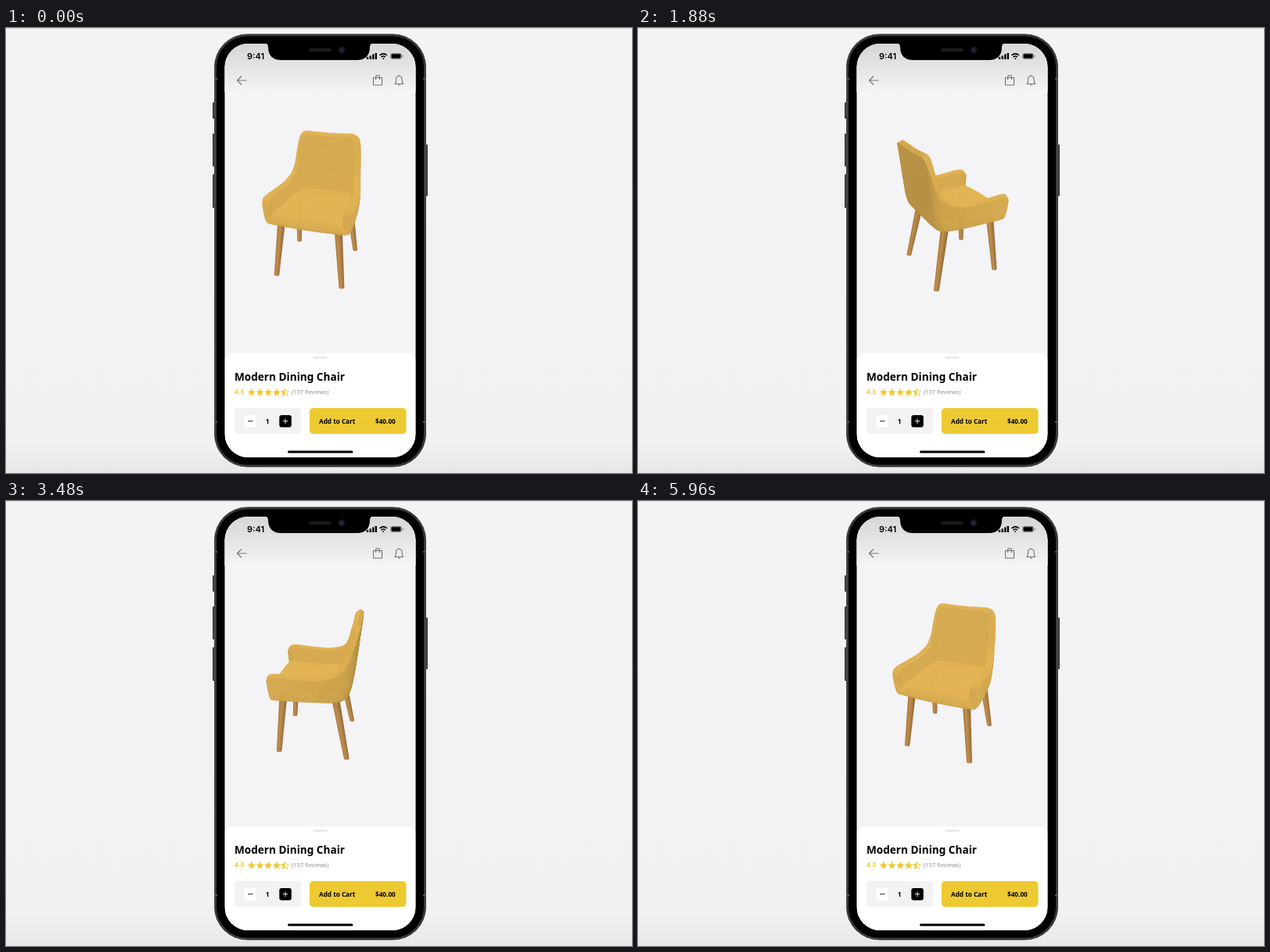
An HTML page with a canvas for the animation above (6 s loop, 800x569 px).

```html
<!DOCTYPE html>
<html lang="en">
<head>
<meta charset="utf-8">
<title>Modern Dining Chair</title>
<style>
  html, body { margin: 0; width: 100%; height: 100%; overflow: hidden; background: #f2f1f2; }
  svg, canvas { position: absolute; left: 0; top: 0; width: 800px; height: 569px; }
  text { font-family: "Noto Sans", sans-serif; }
</style>
</head>
<body>
<svg viewBox="0 0 800 569">
  <defs>
    <linearGradient id="room" x2="0" y2="1">
      <stop offset="0" stop-color="#f4f3f4"/>
      <stop offset=".93" stop-color="#f2f1f2"/>
      <stop offset="1" stop-color="#e7e7e7"/>
    </linearGradient>
    <linearGradient id="fade" x2="0" y2="1">
      <stop offset="0" stop-color="#d6d6d7"/>
      <stop offset="1" stop-color="#f4f3f5"/>
    </linearGradient>
    <clipPath id="screen"><rect x="279.500" y="20" width="244" height="529" rx="30"/></clipPath>
    <path id="star" d="M0-5.200 1.500-1.700 5-1.500 2.300.9 3.200 4.500 0 2.500-3.200 4.500-2.300.9-5-1.500-1.500-1.700z"/>
  </defs>
  <rect width="800" height="569" fill="url(#room)"/>
  <rect width="800" height="1" fill="#d9d9d9"/>

  <g fill="#3c3f3d">
    <rect x="264" y="95" width="4" height="21" rx="1"/>
    <rect x="264" y="135" width="4" height="42" rx="1"/>
    <rect x="264" y="187" width="4" height="43" rx="1"/>
    <rect x="535" y="149" width="4" height="66" rx="1"/>
  </g>
  <rect x="266.500" y="8" width="270" height="553" rx="42" fill="#000" stroke="#4d504e"/>
  <rect x="268" y="9.500" width="267" height="550" rx="40.500" fill="#000" stroke="#3a3d3b" stroke-width="2"/>
  <path d="M266 65h4M533 65h4M266 504h4M533 504h4" stroke="#5b5e5c" stroke-width="2"/>
  <g clip-path="url(#screen)">
    <rect x="279" y="20" width="246" height="530" fill="#f4f3f5"/>
    <rect x="279" y="20" width="246" height="62" fill="url(#fade)"/>
    <rect x="280" y="416" width="243.500" height="150" rx="9" fill="#fff"/>
  </g>

  <text x="308" y="40" font-size="11" font-weight="600" style="font-family:Inter,sans-serif">9:41</text>
  <path d="M462 40v-3M465.700 40v-4.500M469.300 40v-6.500M472.800 40v-8" stroke="#000" stroke-width="2.300"/>
  <g fill="none" stroke="#000" stroke-width="1.500">
    <path d="M477.500 35q4.700-4.300 9.400 0M479.500 37.300q2.700-2.500 5.400 0"/>
    <path d="M481.300 39.200h1.800"/>
  </g>
  <rect x="491.500" y="32.500" width="14" height="7" rx="2" fill="none" stroke="#888"/>
  <rect x="492.500" y="33.300" width="12" height="5.400" rx="1" fill="#000"/>
  <path d="M507.200 34.500v3" stroke="#888"/>
  <path d="M328 19q7 0 7 5 0 17 17 17h96q17 0 17-17 0-5 7-5z"/>
  <rect x="387" y="26" width="29" height="4" rx="2" fill="#1d1d1e"/>
  <circle cx="429" cy="28" r="4.500" fill="#16181f"/>
  <circle cx="429" cy="28" r="2" fill="#252b3d"/>

  <g fill="none" stroke="#757576" stroke-width="1.100" stroke-linejoin="round">
    <path d="M307.500 67H296M301 61.500 295.500 67l5.500 5.500"/>
    <path d="M469.500 63.500h11v9.500h-11zM472.500 66v-3q0-2.500 2.500-2.500t2.500 2.500v3"/>
    <path d="M497 71.500h10.600q-1.500-1.400-1.500-5.200 0-5-3.800-5t-3.800 5q0 3.800-1.500 5.200zM501 72.500q1.300 1.400 2.600 0M502.300 60v1.200"/>
  </g>

  <rect x="393" y="421" width="17.500" height="1.500" rx=".7" fill="#d9d9da"/>
  <text x="292" y="451" font-size="13.600" font-weight="600">Modern Dining Chair</text>
  <g fill="#efc833">
    <text x="292" y="468" font-size="8.400" font-weight="600">4.3</text>
    <use href="#star" x="313.800" y="466"/>
    <use href="#star" x="324.500" y="466"/>
    <use href="#star" x="335.200" y="466"/>
    <use href="#star" x="345.900" y="466"/>
    <use href="#star" x="356.600" y="466" fill="none" stroke="#efc833" stroke-width=".8"/>
    <path d="M356.600 460.800v7.700l-3.200 2 .9-3.600-2.700-2.400 3.500-.2z"/>
  </g>
  <text x="365" y="468" font-size="7.500" fill="#929293">(137 Reviews)</text>

  <rect x="292" y="486" width="85" height="33" rx="4" fill="#f3f2f3"/>
  <rect x="304.500" y="495" width="15.500" height="15.500" rx="3" fill="#fff"/>
  <rect x="349.300" y="495" width="15.500" height="15.500" rx="3"/>
  <path d="M309 502.700h6.500" stroke="#222"/>
  <path d="M353.800 502.700h6.500M357 499.500v6.500" stroke="#fff" stroke-width=".9"/>
  <text x="334.300" y="506" font-size="8.500" font-weight="600" text-anchor="middle">1</text>
  <rect x="388" y="486" width="123.500" height="33" rx="4.500" fill="#edca32"/>
  <g font-size="8.200" font-weight="600">
    <text x="400" y="506">Add to Cart</text>
    <text x="472" y="506">$40.00</text>
  </g>
  <circle cx="459.700" cy="503" r=".7" fill="#b59a25"/>
  <rect x="360" y="540.500" width="83.500" height="3" rx="1.500"/>
</svg>
<canvas id="stage" width="800" height="569"></canvas>
<script>
const ctx = document.getElementById('stage').getContext('2d');
const PITCH = 27 * Math.PI / 180, SP = Math.sin(PITCH), CP = Math.cos(PITCH);
const DIST = 405, CX = 399, CY = 235.5, DROP = 64, BASE = 73;

// Turntable: seconds, degrees, degrees per second
const TURN = [[0, -17, 58], [.88, 38, 70], [1.88, 119, 90], [2.48, 175, 93],
              [3.48, 260, 72], [4.08, 293, 45], [6, 339, 40]];

// Half of the shell from the middle of the back to the arm tip:
// top x, top z, top height, bottom x, bottom z
const HALF = [
  [0, -47, 154.5, 0, -34], [20, -47, 155, 16, -34], [32, -46.5, 155, 27, -33.5],
  [37, -45, 149, 33, -32.5], [39.5, -41, 133, 37, -29], [41, -36, 118, 39, -25],
  [43, -27, 108, 41, -18], [46.5, -9, 102.5, 42.5, -6], [48.5, 12, 102, 44, 12],
  [49, 35, 103.5, 45, 31], [48.5, 43, 102, 45, 40], [47.5, 46, 98, 44.5, 43]];

const lerp = (a, b, t) => a + (b - a) * t;
const sub = (a, b) => a.map((v, i) => v - b[i]);
const cross = (a, b) => [a[1] * b[2] - a[2] * b[1], a[2] * b[0] - a[0] * b[2], a[0] * b[1] - a[1] * b[0]];

function hermite(a, b, ma, mb, t) {
  const t2 = t * t, t3 = t2 * t;
  return a * (2 * t3 - 3 * t2 + 1) + ma * (t3 - 2 * t2 + t) + b * (3 * t2 - 2 * t3) + mb * (t3 - t2);
}

function yawAt(s) {
  let i = 0;
  while (i < TURN.length - 2 && s > TURN[i + 1][0]) i++;
  const [t0, a, ma] = TURN[i], [t1, b, mb] = TURN[i + 1], d = t1 - t0;
  return hermite(a, b, ma * d, mb * d, (s - t0) / d) * Math.PI / 180;
}

const profile = [...HALF.slice(1).reverse().map(([x, z, h, bx, bz]) => [-x, z, h, -bx, bz]), ...HALF];

function profileAt(u) {
  const last = profile.length - 1, i = Math.min(Math.floor(u), last - 1);
  const at = n => profile[Math.max(0, Math.min(last, n))];
  return at(i).map((v, c) => hermite(v, at(i + 1)[c],
    (at(i + 1)[c] - at(i - 1)[c]) / 2, (at(i + 2)[c] - v) / 2, u - i));
}

function wallPoint([x, z, top, bx, bz], h, inner) {
  const k = Math.max(0, Math.min(1, (h - BASE) / 22)), bulge = Math.sqrt(k * (2 - k));
  const px = lerp(bx, x, bulge);
  const pz = lerp(bz, z, .45 * bulge + .55 * (h - BASE) / (top - BASE));
  return inner ? [px * .84, h, pz + 8 * Math.max(0, -pz / 47)] : [px, h, pz];
}

// Cross-section: up the outside, over the rim, down the inside
const STEPS = 8;
function ring(p) {
  const outer = [], inner = [];
  for (let k = 0; k <= STEPS; k++) {
    const v = k / STEPS;
    outer.push(wallPoint(p, lerp(BASE, p[2] - 2, v * (.5 + .5 * v))));
    inner.push(wallPoint(p, lerp(79, p[2] - 2, v), true));
  }
  const a = outer[STEPS], b = inner[STEPS];
  const rim = [(a[0] + b[0]) / 2, p[2] + .5, (a[2] + b[2]) / 2];
  return { outer: [...outer, rim], inner: [...inner, rim] };
}

const faces = [];
function addGrid(g) {
  for (let u = 0; u < g.length - 1; u++)
    for (let k = 0; k < g[u].length - 1; k++) {
      const q = [g[u][k], g[u][k + 1], g[u + 1][k + 1], g[u + 1][k]];
      const n = cross(sub(q[2], q[0]), sub(q[3], q[1])), len = Math.hypot(...n) || 1;
      const ny = n[1] / len, nz = n[2] / len;
      const f = .94 + .06 * ny + .13 * Math.min(0, nz);
      faces.push({ q, color: `rgb(${[227, 180, 84].map(c => Math.round(c * f))})` });
    }
}

const rings = [];
for (let u = 0; u <= (profile.length - 1) * 3; u++) rings.push(ring(profileAt(u / 3)));
addGrid(rings.map(r => [...r.outer, ...r.inner.slice(0, -1).reverse()]));
const tip = rings[rings.length - 1];
addGrid([rings[0].inner, rings[0].outer]);
addGrid([tip.outer, tip.inner]);

// Cushion with a rolled front edge
const seat = [];
for (let i = 0; i <= 12; i++) {
  const x = i / 6 - 1, col = [];
  for (let k = 0; k <= 11; k++) {
    const v = k / 11, z = lerp(-34, 44, v);
    col.push([x * (33 + 7 * Math.sqrt(v)), 84 + 2.5 * (1 - x * x) - 1.5 * v, z]);
  }
  for (const [h, z] of [[80.5, 47], [77, 48], [74, 47], [72, 44]]) col.push([x * 43, h, z - 2 * x * x]);
  seat.push(col);
}
addGrid(seat);

function project([x, h, z], cos, sin) {
  const vx = x * cos + z * sin, vz = z * cos - x * sin;
  const depth = vz * CP + h * SP, s = DIST / (DIST - depth);
  return { x: CX + vx * s, y: CY - (h * CP - DROP - vz * SP) * s, depth, s };
}

function drawLeg({ top, foot }) {
  const wt = 4.3 * top.s, wf = 3.1 * foot.s;
  const dx = foot.x - top.x, dy = foot.y - top.y, len = Math.hypot(dx, dy);
  const nx = dy / len * wt, ny = -dx / len * wt;
  const g = ctx.createLinearGradient(foot.x - nx, foot.y - ny, foot.x + nx, foot.y + ny);
  g.addColorStop(0, '#a87b40');
  g.addColorStop(.4, '#bd8d4d');
  g.addColorStop(1, '#906633');
  ctx.fillStyle = g;
  ctx.beginPath();
  ctx.moveTo(top.x - wt, top.y);
  ctx.lineTo(foot.x - wf, foot.y - 1);
  ctx.ellipse(foot.x, foot.y - 1, wf, 1.6, 0, Math.PI, 0, true);
  ctx.lineTo(top.x + wt, top.y);
  ctx.fill();
}

function drawChair(yaw) {
  const cos = Math.cos(yaw), sin = Math.sin(yaw);
  ctx.clearRect(0, 0, 800, 569);
  // The rear legs splay more than the front ones
  [[-1, -1], [-1, 1], [1, -1], [1, 1]].map(([x, z]) => ({
    top: project([32 * x, 76, z > 0 ? 33 : -24], cos, sin),
    foot: project([40 * x, 0, 40 * z], cos, sin)
  })).sort((a, b) => a.foot.depth - b.foot.depth).forEach(drawLeg);

  const visible = [];
  for (const { q, color } of faces) {
    const p = q.map(v => project(v, cos, sin));
    const area = (p[2].x - p[0].x) * (p[3].y - p[1].y) - (p[2].y - p[0].y) * (p[3].x - p[1].x);
    if (area < 0) visible.push({ p, color, depth: p[0].depth + p[1].depth + p[2].depth + p[3].depth });
  }
  visible.sort((a, b) => a.depth - b.depth);
  ctx.lineWidth = .7;
  ctx.lineJoin = 'round';
  for (const { p, color } of visible) {
    ctx.fillStyle = ctx.strokeStyle = color;
    ctx.beginPath();
    p.forEach(v => ctx.lineTo(v.x, v.y));
    ctx.closePath();
    ctx.fill();
    ctx.stroke();
  }
}

function tick() {
  drawChair(yawAt(performance.now() % 6000 / 1000));
  requestAnimationFrame(tick);
}
tick();
</script>
</body>
</html>
```
